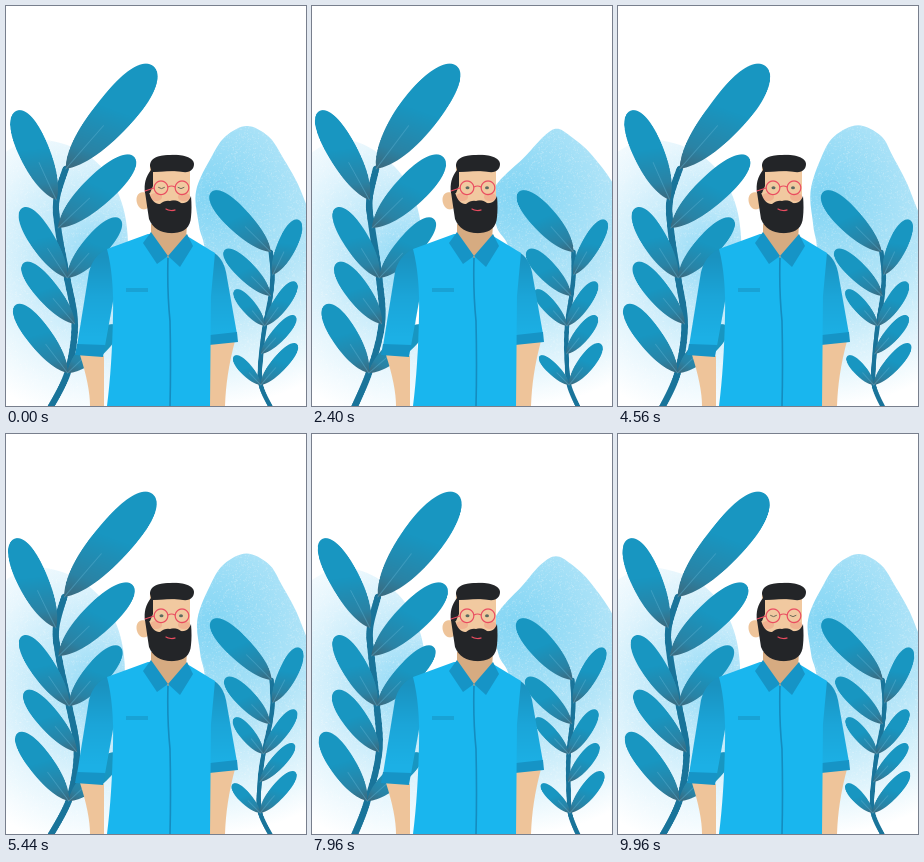
These frames come from a looping animation (300x400 px, 10000 ms). An HTML page with a canvas:

```html
<!DOCTYPE html>
<html>
<head>
<meta charset="utf-8">
<style>
  html, body { margin: 0; width: 100%; height: 100%; overflow: hidden; background: #fff; }
  canvas { display: block; }
</style>
</head>
<body>
<canvas id="stage" width="300" height="400"></canvas>
<script>
const W = 300, H = 400, PERIOD = 5000, TAU = Math.PI * 2;
const SKIN = '#eec49a', HAIR = '#232528', SHIRT = '#19b6ee', DARK = '#1694c6', RED = '#ea4c60';
const ctx = document.getElementById('stage').getContext('2d');
const wave = p => Math.cos(TAU * p);

function layer(scale, paint) {
  const canvas = document.createElement('canvas');
  canvas.width = W * scale;
  canvas.height = H * scale;
  const g = canvas.getContext('2d');
  g.scale(scale, scale);
  paint(g);
  return canvas;
}

// Catmull-Rom curve through points
function smooth(g, pts) {
  const at = i => pts[Math.max(0, Math.min(pts.length - 1, i))];
  g.beginPath();
  g.moveTo(...pts[0]);
  for (let i = 0; i < pts.length - 1; i++) {
    const [a, b, c, d] = [at(i - 1), at(i), at(i + 1), at(i + 2)];
    g.bezierCurveTo(b[0] + (c[0] - a[0]) / 6, b[1] + (c[1] - a[1]) / 6,
      c[0] - (d[0] - b[0]) / 6, c[1] - (d[1] - b[1]) / 6, c[0], c[1]);
  }
}

function fillPath(g, d, color) {
  g.fillStyle = color;
  g.fill(new Path2D(d));
}

function strokePath(g, d, color, width) {
  g.strokeStyle = color;
  g.lineWidth = width;
  g.lineCap = 'round';
  g.stroke(new Path2D(d));
}

function ellipse(g, x, y, rx, ry) {
  g.beginPath();
  g.ellipse(x, y, rx, ry, 0, 0, TAU);
}

function fade(gradient, ...stops) {
  stops.forEach(([at, color]) => gradient.addColorStop(at, color));
  return gradient;
}

// Every leaf has the same proportions and is shaded at the lower side of its base
function leaf(g, [x, y], [tipX, tipY]) {
  const L = Math.hypot(tipX - x, tipY - y), h = .15 * L;
  const low = tipX > x ? h : -h;
  g.save();
  g.translate(x, y);
  g.rotate(Math.atan2(tipY - y, tipX - x));
  g.beginPath();
  g.moveTo(0, 0);
  g.bezierCurveTo(.1 * L, -.6 * h, .3 * L, -h, .6 * L, -h);
  g.bezierCurveTo(.85 * L, -h, L, -.6 * h, L, 0);
  g.bezierCurveTo(L, .6 * h, .85 * L, h, .6 * L, h);
  g.bezierCurveTo(.3 * L, h, .1 * L, .6 * h, 0, 0);
  g.fillStyle = fade(g.createLinearGradient(0, low, .55 * L, -.3 * low),
    [0, '#43606f'], [.4, '#2a83a5'], [1, '#1896c1']);
  g.fill();
  strokePath(g, `M0 0L${.42 * L} 0`, 'rgba(90,175,208,.45)', 1);
  g.restore();
}

// tips[i] lists the leaf tips growing from the stem's node i + 1
function plant(stem, stemWidth, tips) {
  return layer(2, g => {
    smooth(g, stem);
    g.lineWidth = stemWidth;
    g.lineCap = 'round';
    g.strokeStyle = '#19749a';
    g.stroke();
    tips.forEach((group, i) => group.forEach(tip => leaf(g, stem[i + 1], tip)));
  });
}

const bigPlant = plant(
  [[41, 406], [59, 367], [69, 318], [64, 272], [56, 222], [54, 194], [62, 163]], 6.5,
  [[[11, 299], [111, 320]], [[21, 257]], [[20, 202], [118, 213]], [[130, 151]], [[9, 105]], [[146, 60]]]);

const smallPlant = plant(
  [[268, 406], [256, 379], [255, 348], [257, 320], [262, 290], [264, 269], [263, 246]], 4.5,
  [[[228, 350], [290, 338]], [[287, 310]], [[226, 284], [287, 276]], [[217, 244]], [[293, 214]], [[206, 186]]]);

// Horizontal wave that travels upward and is damped at both ends
function sway(image, p, top, amp, crestY, crestPhase, slope) {
  for (let y = top; y < H; y++) {
    const damp = Math.min(1, .3 + (y - top) / 65, .3 + (H - y) / 50);
    const dx = amp * damp * wave(p - crestPhase - (crestY - y) * slope);
    ctx.drawImage(image, 0, y * 2, W * 2, 2, dx, y, W, 1);
  }
}

let seed = 7;
const random = () => (seed = seed * 16807 % 2147483647) / 2147483647;
const grain = layer(1, g => {
  g.fillStyle = 'rgba(255,255,255,.2)';
  for (let i = 0; i < 14000; i++) g.fillRect(random() * W, 110 + random() * 290, 1, 1);
});

function blob(pts, paint) {
  ctx.save();
  smooth(ctx, pts);
  ctx.closePath();
  ctx.fillStyle = paint;
  ctx.fill();
  ctx.clip();
  ctx.drawImage(grain, 0, 0);
  ctx.restore();
}

const leftPaint = fade(ctx.createRadialGradient(92, 250, 0, 92, 250, 165),
  [0, '#92daf6'], [.35, '#c3eafa'], [.68, '#e6f6fd'], [1, '#fff']);
const rightPaint = fade(ctx.createRadialGradient(205, 190, 0, 205, 190, 210),
  [0, '#82d5f4'], [.5, '#b4e5f8'], [1, '#fff']);

function blobs(p) {
  const edge = 116 + 7 * wave(p - .9);
  blob([[-20, 160], [25, 134], [edge - 45, 146], [edge - 13, 180], [edge, 230],
    [edge - 6, 300], [95, 410], [-20, 410]], leftPaint);

  // 1 is a pointed hill, below 0 a wide dome
  const peak = (wave(2 * (p - .015)) - wave(p - .015)) / 2;
  blob([[200, 410], [200, 260], [193 - 9 * peak, 220], [190 - 10 * peak, 185], [206 + 8 * peak, 150],
    [220 + 13 * peak, 130], [241 + 4 * peak, 120 + 3 * peak], [262 - 4 * peak, 130],
    [276 + 5 * peak, 150], [297 + 11 * peak, 190], [312 + 10 * peak, 250], [310, 410]], rightPaint);
}

const man = layer(2, g => {
  const sleeve = y => fade(g.createLinearGradient(0, y, 0, y + 80),
    [0, '#1a92c0'], [.5, '#1ba5d8'], [1, '#1cb0e5']);

  // Forearms
  fillPath(g, 'M74 349L98 350L98 400L84 400Q84 380 74 349Z', SKIN);
  fillPath(g, 'M204 336L229 335Q220 368 219 400L204 400Z', SKIN);

  // Shirt and sleeves
  fillPath(g, 'M101 243Q87 250 83 266L71 340L99 340L108 290L116 245Z', sleeve(250));
  fillPath(g, 'M71 338L99 339L97 351L69 349Z', DARK);
  fillPath(g, 'M207 246Q217 252 220 266L231 328L204 330L202 260Z', sleeve(250));
  fillPath(g, 'M204 329L231 326L232 336L203 339Z', DARK);
  fillPath(g, 'M142 228L101 243Q108 270 107 310Q106 360 101 400L204 400L205 290L209 247L181 230Z', SHIRT);
  strokePath(g, 'M162 251Q161 285 164 315Q165 360 164 400', '#158cbf', 1.6);
  fillPath(g, 'M120 282H142V286H120Z', '#18a2d5');

  // Neck and collar
  fillPath(g, 'M145 218L181 218L180 234L162 252L145 232Z', '#d6ab81');
  fillPath(g, 'M145 226L137 237L151 258L162 250Z', DARK);
  fillPath(g, 'M181 228L187 240L174 261L162 250Z', DARK);

  // Head
  fillPath(g, 'M141 187C133 184 129 190 131 197C133 204 139 205 143 201Z', SKIN);
  fillPath(g, 'M144 160H184V205H143Z', '#f1c9a0');
  g.fillStyle = 'rgba(238,120,105,.28)';
  for (const x of [150, 178]) {
    ellipse(g, x, 191, 6, 4);
    g.fill();
  }
  fillPath(g, 'M144 160C144 152 152 149 164 149C178 148 188 152 188 158C188 164 183 167 177 166C165 164 156 166 147 166L147 180L144 187H139Q137 174 145 164Z', HAIR);
  fillPath(g, 'M139 186L143 186Q146 198 154 198Q159 194 164 195Q170 193 175 197Q182 198 185 190Q186 202 185 211Q184 226 168 227Q149 228 143 213Q141 200 139 186Z', HAIR);
  strokePath(g, 'M160 203Q164 205.5 169 204', RED, 1.2);

  // Glasses
  for (const x of [155, 176]) {
    ellipse(g, x, 181.8, 6.8, 6.8);
    g.strokeStyle = RED;
    g.lineWidth = 1.2;
    g.stroke();
  }
  strokePath(g, 'M162 181Q165.5 179 169 181M148 182L139 185', RED, 1.1);
});

function eyes(closed) {
  for (const x of [155.5, 175]) {
    if (closed) {
      strokePath(ctx, `M${x - 3} 181.5Q${x} 184 ${x + 3} 181.5`, '#6d6a58', 1);
    } else {
      ellipse(ctx, x, 181.8, 2, 1.5);
      ctx.fillStyle = '#5c6a60';
      ctx.fill();
    }
  }
}

function frame() {
  const t = performance.now() % PERIOD, p = t / PERIOD;
  ctx.fillStyle = '#fff';
  ctx.fillRect(0, 0, W, H);
  blobs(p);
  sway(bigPlant, p, 56, 4, 222, .5, .0025);
  sway(smallPlant, p, 183, 2.7, 245, .14, .0037);
  ctx.drawImage(man, 0, 0, W, H);
  eyes(t < 150 || t > PERIOD - 150);
  requestAnimationFrame(frame);
}
frame();
</script>
</body>
</html>
```
